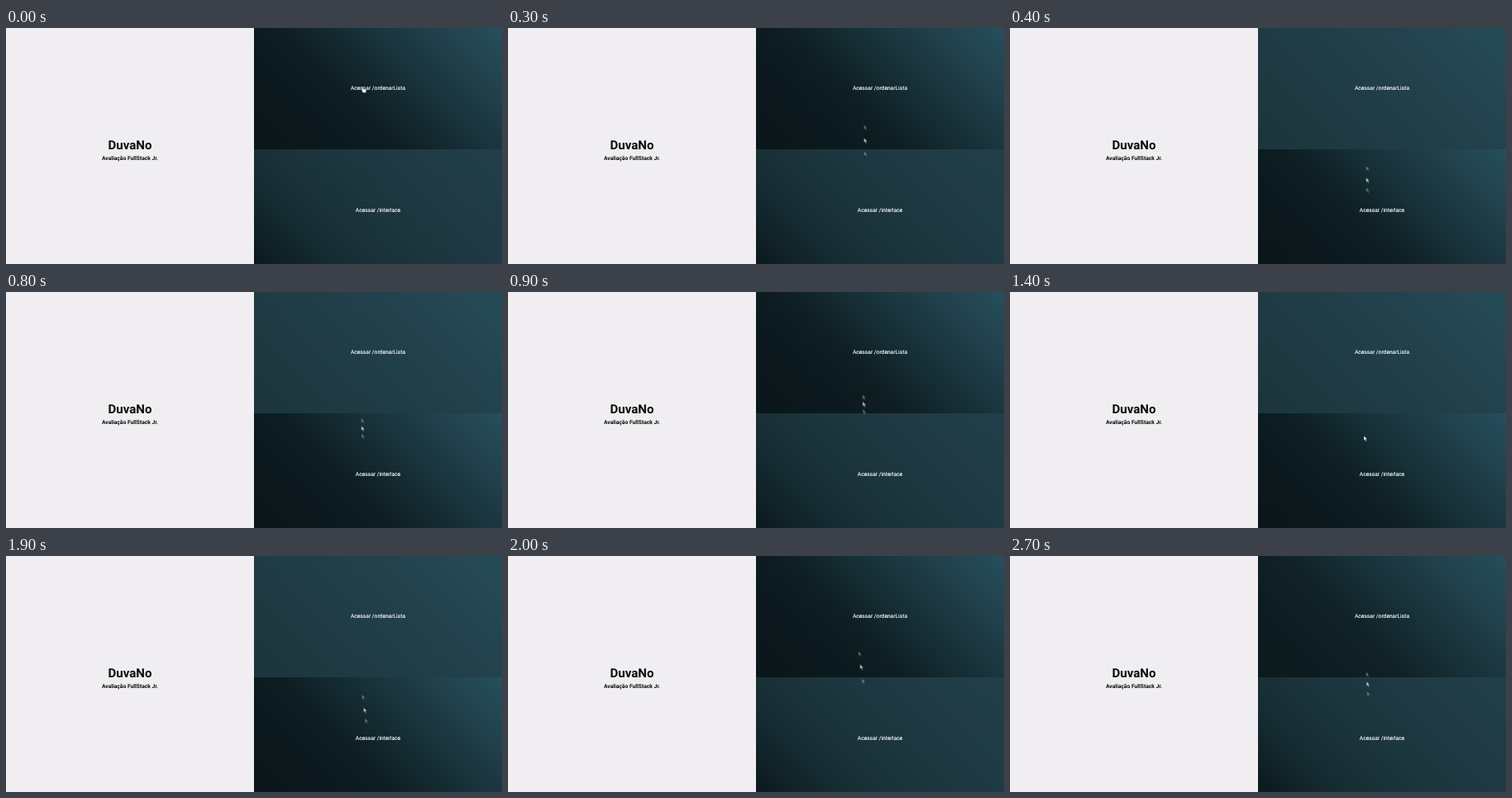
These frames come from a looping animation (600x286 px, 2.8 s). An HTML page:

```html
<!DOCTYPE html>
<html lang="pt">
<head>
<meta charset="utf-8">
<style>
html, body { margin: 0; width: 100%; height: 100%; overflow: hidden; background: #f0eef1; }
svg { display: block; width: 600px; height: 286px; }
text { font-family: Roboto, sans-serif; font-size: 6.7px; text-anchor: middle; text-rendering: geometricPrecision; }
.bold { font-weight: 700; fill: #0a0a0c; }
.title { font-size: 15px; }
.link { fill: #fff; stroke: #fff; stroke-width: .12; }
</style>
</head>
<body>
<svg viewBox="0 0 600 286">
  <defs id="defs">
    <path id="arrow" d="M0 0V6.2L1.4 5L2.5 7.3L3.5 6.8L2.5 4.6H4.4Z" fill="#f4f6f6" stroke="#10181c" stroke-width=".5"/>
    <path id="hand" d="M1.6 0Q2.5 0 2.5 1V2.8L5 3.3Q6 3.6 5.9 4.6L5.4 7.6H2L.1 5Q-.3 4.1.9 4.3V1Q.9 0 1.6 0Z" fill="#fff" stroke="#10181c" stroke-width=".5"/>
  </defs>
  <rect width="600" height="286" fill="#f0eef1"/>
  <g id="panels"></g>
  <text class="bold title" x="150" y="147.3">DuvaNo</text>
  <text class="bold" x="150" y="160.2">Avaliação FullStack Jr.</text>
  <text class="link" x="450" y="75.1">Acessar /ordenarLista</text>
  <text class="link" x="450" y="223.3">Acessar /interlace</text>
  <use id="before" href="#arrow"/>
  <use id="after" href="#arrow"/>
  <use id="pointer" href="#arrow"/>
</svg>
<script>
const NS = 'http://www.w3.org/2000/svg';
const LOOP = 2800, STEP = 100, SPLIT = 147, LINK_Y = 71;
const TRAIL = 32, HOVER_LAG = 20;
const $ = id => document.getElementById(id);

function add(parent, tag, attrs) {
  const el = document.createElementNS(NS, tag);
  for (const k in attrs) el.setAttribute(k, attrs[k]);
  return parent.appendChild(el);
}

// Evenly spaced stops on a 45 degree gradient across one panel
function panel(id, top, colors) {
  const grad = add($('defs'), 'linearGradient', {
    id, gradientUnits: 'userSpaceOnUse',
    x1: 338.1, y1: top + 185.6, x2: 561.9, y2: top - 38.1
  });
  colors.forEach((color, i) =>
    add(grad, 'stop', { offset: i / (colors.length - 1), 'stop-color': color }));
  return add($('panels'), 'rect', { x: 300, y: top, width: 300, height: 148, fill: `url(#${id})` });
}

const active = ['#0a161a', '#0b181d', '#0e1e23', '#173038', '#20404b', '#264f5d'];
panel('topIdle', 0, ['#1c353c', '#1f3b44', '#22424d', '#264c59']);
const topOn = panel('topActive', 0, active);
panel('lowIdle', SPLIT, ['#0a171c', '#162c33', '#1c363e', '#1f3b45', '#213f4a']);
const lowOn = panel('lowActive', SPLIT, active);

// Turning points of the pointer tip: ms, x, y
const turns = [
  [100, 430, LINK_Y], [530, 431, 210], [1130, 428, 96], [1370, 428, 174], [1450, 428, 174],
  [1700, 436, 212], [1785, 436, 212], [2150, 420, 85], [2420, 428, 85], [2970, 434, 215]
];

function tip(ms) {
  const next = Math.max(1, turns.findIndex(p => p[0] > ms));
  const [t0, x0, y0] = turns[next - 1], [t1, x1, y1] = turns[next];
  const part = Math.max(0, (ms - t0) / (t1 - t0));
  const ease = (1 - Math.cos(Math.PI * part)) / 2;
  return { x: x0 + (x1 - x0) * ease, y: y0 + (y1 - y0) * ease };
}

function place(el, { x, y }, opacity) {
  el.setAttribute('transform', `translate(${x} ${y})`);
  el.setAttribute('opacity', opacity);
}

function draw(time) {
  const ms = Math.floor(time % LOOP / STEP) * STEP;
  const pos = tip(ms);
  const trail = [tip(ms - TRAIL), tip(ms + TRAIL)];
  const far = trail.map(p => Math.abs(p.y - pos.y) > 3);
  const low = tip(ms - HOVER_LAG).y > SPLIT;
  topOn.setAttribute('opacity', low ? 0 : ms < 2500 ? 1 : .88);
  lowOn.setAttribute('opacity', low ? 1 : 0);
  $('pointer').setAttribute('href', Math.abs(pos.y - LINK_Y) < 4 ? '#hand' : '#arrow');
  place($('before'), trail[0], far[0] ? .35 : 0);
  place($('after'), trail[1], far[1] ? .35 : 0);
  place($('pointer'), pos, far[0] || far[1] ? .75 : 1);
}

const start = performance.now();
function tick() {
  draw(performance.now() - start);
  requestAnimationFrame(tick);
}
tick();
</script>
</body>
</html>
```
